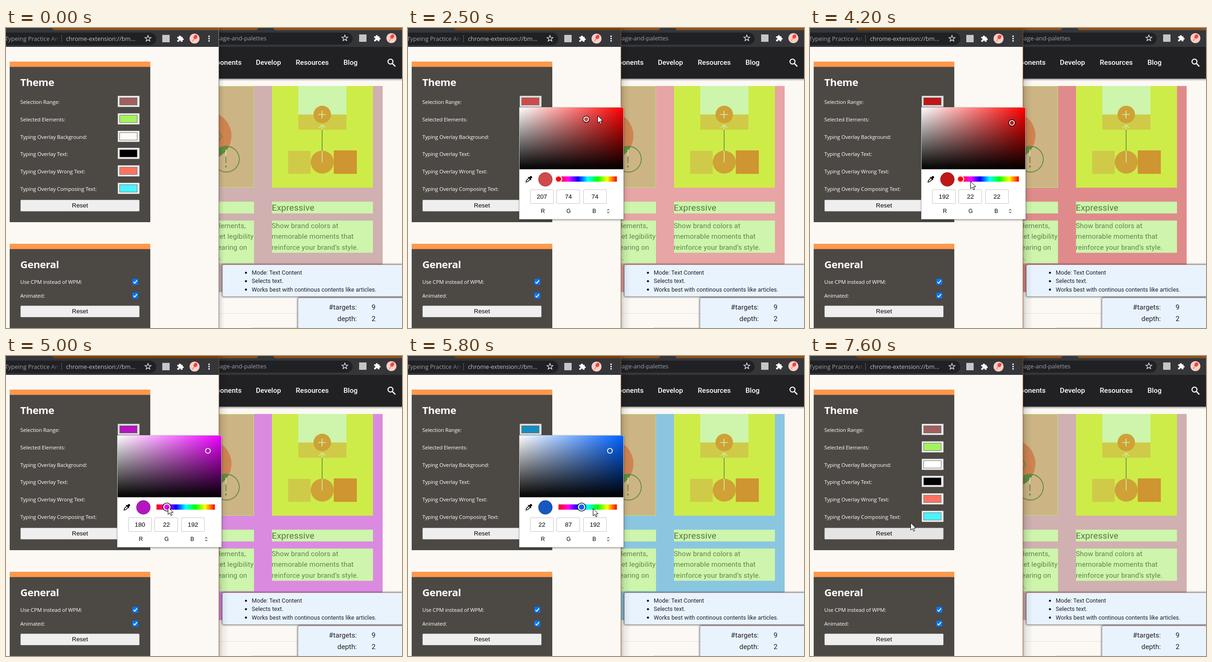
An HTML page for the animation above (7700 ms loop, 859 px wide and 652 px high).

```html
<!DOCTYPE html>
<html lang="en">
<head>
<meta charset="utf-8">
<title>Theme settings</title>
<style>
html, body { margin: 0; width: 100%; height: 100%; overflow: hidden; background: #fcf9f4; }
svg { display: block; width: 859px; height: 652px; }
text { white-space: pre; }
.ui { font-family: "Open Sans", "Noto Sans", sans-serif; }
.web { font-family: Roboto, sans-serif; }
.ctl { font-family: "Liberation Sans", Arial, sans-serif; }
</style>
</head>
<body>
<svg id="stage" viewBox="0 0 859 652" xmlns="http://www.w3.org/2000/svg"></svg>
<script>
const LOOP = 7700, STEP = 100;
const MINT = '#cdf5ac', LEAF = '#5f8c42';

const rect = (x, y, w, h, fill, more = '') =>
  `<rect x="${x}" y="${y}" width="${w}" height="${h}" fill="${fill}" ${more}/>`;
const frame = (x, y, w, h, fill, stroke, more = '') =>
  rect(x + .5, y + .5, w - 1, h - 1, fill, `stroke="${stroke}" ${more}`);
const disc = (x, y, r, fill, more = '') =>
  `<circle cx="${x}" cy="${y}" r="${r}" fill="${fill}" ${more}/>`;
const line = (d, stroke, w = 1, more = '') =>
  `<path d="${d}" fill="none" stroke="${stroke}" stroke-width="${w}" ${more}/>`;
const text = (x, y, s, size, fill, cls, more = '') =>
  `<text x="${x}" y="${y}" font-size="${size}" fill="${fill}" class="${cls}" ${more}>${s}</text>`;
const END = 'text-anchor="end"', MID = 'text-anchor="middle"';
const ramp = (id, dir, stops) => `<linearGradient id="${id}" ${dir}>` + stops.map(([o, c, a = 1]) =>
  `<stop offset="${o}" stop-color="${c}" stop-opacity="${a}"/>`).join('') + '</linearGradient>';
const ACROSS = 'x1="0" x2="1"', DOWN = 'x1="0" x2="0" y1="0" y2="1"';

function star(x, y) {
  let d = '';
  for (let i = 0; i < 10; i++) {
    const r = i % 2 ? 2.9 : 6.8, a = i * Math.PI / 5;
    d += (i ? 'L' : 'M') + (x + r * Math.sin(a)).toFixed(1) + ' ' + (y - r * Math.cos(a)).toFixed(1);
  }
  return line(d + 'Z', '#e8eaed', 1.3);
}

const puzzle = (x, y) => `<path transform="translate(${x - 7},${y - 7})" fill="#fff"
  d="M1.5 3H4.3A2 2 0 1 1 8.2 3H11Q12 3 12 4V6.4A2 2 0 1 1 12 10.2V13Q12 14 11 14H8.4A2 2 0 1 0 4.5 14H1.5Q.5 14 .5 13V10.2A2 2 0 1 0 .5 6.4V4Q.5 3 1.5 3Z"/>`;

const avatar = (x, y) => disc(x, y, 10.8, '#fccfc8') +
  `<ellipse cx="${x + 2}" cy="${y - 3.5}" rx="4" ry="5" fill="#f0473f" transform="rotate(35 ${x + 2} ${y - 3.5})"/>` +
  line(`M${x - 1} ${y + 1}l-4 5`, '#ef9a78', 2.2);

const toolbar = (x, y) => star(x, y) + rect(x + 31, y - 8, 16, 16, '#c6c6c6') + puzzle(x + 70, y) + avatar(x + 101, y);

function rightWindow() {
  let s = rect(462, 0, 397, 652, '#fcf8f3') + rect(462, 0, 397, 41, '#35363a') +
    '<path d="M462 0H547Q546 5 541 5H462ZM580 0H859V5H586Q581 5 580 0Z" fill="#8a5020"/>' +
    rect(440, 10, 312, 26, '#202124', 'rx="13"') +
    text(565, 27, 'usage-and-palettes', 13, '#9aa0a6', 'ui', END) + toolbar(735, 22);
  s += rect(462, 110, 397, 5, 'url(#under)') + rect(462, 41, 397, 69, '#212124');
  s += text(511, 80, 'Components', 15.2, '#fff', 'web', END + ' font-weight="500"');
  [[542, 'Develop'], [628.5, 'Resources'], [732, 'Blog']].forEach(([x, w]) =>
    s += text(x, 80, w, 15.2, '#fff', 'web', 'font-weight="500"'));
  s += disc(834, 73, 5.4, 'none', 'stroke="#fff" stroke-width="2.2"') + line('M838 77l6.5 6.5', '#fff', 2.5);
  s += rect(462, 620, 172, 1, '#e2dfda') + rect(533, 651, 100, 1, '#d8d5d2');
  s += rect(440, 126, 377, 448, '#d0b0b0', 'id="range"');

  // first card
  s += frame(440, 126, 98, 221, '#cdb484', '#b5e884') + disc(437, 234, 52, '#cf8450') +
    disc(478, 285, 28, LEAF, 'clip-path="url(#lens)"') +
    disc(478, 285, 28, 'none', `stroke="${LEAF}" stroke-width="1.8"`) +
    line('M477 264V279', MINT, 1.6) + line('M477 279V293', LEAF, 1.8) + disc(477, 301, 1.9, LEAF) +
    line('M462 226L468 236L462 245', LEAF, 1.5);
  // second card
  s += rect(577, 126, 219, 221, '#ceec48') + rect(634, 126, 104.5, 62, MINT) +
    rect(634, 188, 104.5, 33, '#cfcb48') + disc(686, 188, 19, '#cfa136') +
    line('M677 188H694M685.5 179.500V196.500', MINT, 1.7) +
    rect(612, 267, 49, 50, '#cfcb48') + rect(711, 266, 50, 51, '#cf9530') + disc(686, 291.500, 25, '#cfa136') +
    line('M685.700 221V267', LEAF, 1.6) + line('M685.700 211V221M685.700 267V292M679 217L685.700 210.500L692.500 217', MINT, 1.6);
  // captions
  s += rect(440, 377.5, 98, 25.5, MINT) + rect(577, 377.5, 219, 25.5, MINT) +
    rect(440, 418.5, 98, 93, MINT) + rect(577, 418.5, 219, 70, MINT);
  const ink = '#64854d', gap = 'letter-spacing=".1"';
  s += text(576.5, 397, 'Expressive', 19, '#56783f', 'web', 'letter-spacing=".2"');
  ['Show brand colors at', 'memorable moments that', 'reinforce your brand’s style.'].forEach((w, i) =>
    s += text(576.5, 435 + i * 23.3, w, 15.2, ink, 'web', gap));
  [[520, 'elements,'], [537, 'meet legibility'], [523, 'appearing on'], [468, 'surfaces.']].forEach(([x, w], i) =>
    s += text(x, 435 + i * 23.3, w, 15.2, ink, 'web', gap + END));

  // status boxes
  const box = (x, y, w, h) => rect(x, y, w, h, '#000', 'rx="3" opacity=".75" filter="url(#blur)"') +
    frame(x, y, w, h, '#e9f3fd', '#a9afb6', 'rx="3"') + line(`M${x + 2} ${y + .5}H859`, '#d0705c', 1, 'stroke-dasharray="1 1"');
  s += box(469, 514, 400, 70) + box(633, 586, 240, 80);
  ['Mode: Text Content', 'Selects text.', 'Works best with continous contents like articles.'].forEach((w, i) =>
    s += disc(520.5, 532 + i * 18.3, 2.3, '#111') + text(533, 536 + i * 18.3, w, 12.6, '#202124', 'web'));
  [['#targets:', 9], ['depth:', 2]].forEach(([w, n], i) =>
    s += text(761, 612 + i * 25, w, 15.2, '#202124', 'web', END) + text(793, 612 + i * 25, n, 15.2, '#202124', 'web'));
  return s;
}

const button = (y, id) => frame(31, y, 259, 26, '#efefef', '#8a8886', `rx="2" id="${id}"`) +
  text(160.5, y + 17.3, 'Reset', 13.33, '#000', 'ctl', MID);
const label = (y, s) => text(31, y, s, 11.4, '#fff', 'ui', 'letter-spacing="-.12"');
const title = (y, s) => text(31, y, s, 22.2, '#fff', 'ui', 'font-weight="700" letter-spacing="-.4"');
const panel = (y, h) => rect(8, y, 305, h, '#4c4844') + rect(8, y, 305, 11.5, '#ff984a');

function leftWindow() {
  let s = rect(462, 0, 21, 652, 'url(#cast)', 'id="shade"') + rect(0, 0, 462, 652, '#fcf9f4') +
    rect(0, 0, 462, 41, '#35363a') +
    '<path id="strip" d="M100 0H462V5H107Q101 5 100 0Z"/>' +
    rect(-20, 10, 346, 27, '#202124', 'rx="13.500"') +
    text(-2, 28, 'Typeing Practice An', 12.8, '#9aa0a6', 'ui') + rect(96, 14, 19, 20, 'url(#fade)') +
    rect(120, 15, 1, 16, '#5f6368') + text(130, 28, 'chrome-extension://bm...', 12.8, '#bdc1c6', 'ui') + toolbar(308, 23);
  [18, 23, 28].forEach(y => s += disc(440.5, y, 1.7, '#fff'));
  s += rect(461, 0, 1, 652, '#8e8b88', 'id="edge"');
  s += panel(73, 349) + title(126, 'Theme');
  const rows = [['Selection Range:', '#a06060'], ['Selected Elements:', '#a2f35c'], ['Typing Overlay Background:', '#fdfaf4'],
    ['Typing Overlay Text:', '#000'], ['Typing Overlay Wrong Text:', '#ff7262'], ['Typing Overlay Composing Text:', '#4af4ff']];
  rows.forEach(([w, c], i) => {
    const y = Math.round(147 + i * 37.8);
    s += label(y + 17.5, w) + frame(242, y, 48, 25, '#efefef', '#9a9896', `rx="1" id="well${i}"`) +
      frame(246, y + 4, 39, 17, c, '#777', `id="swatch${i}"`);
  });
  s += button(373, 'reset') + panel(469, 190) + title(521.5, 'General');
  [['Use CPM instead of WPM:', 545], ['Animated:', 575]].forEach(([w, y]) =>
    s += label(y + 11, w) + rect(274, y, 13, 13, '#0075ff', 'rx="2"') + line(`M276.500 ${y + 6.8}l2.8 2.8l5-6.3`, '#fff', 1.9));
  return s + button(603, 'reset2');
}

function picker() {
  let s = rect(242, 174, 226, 243, '#000', 'opacity=".45" filter="url(#blur)"') +
    frame(241, 172, 227, 244, '#fff', '#c4c4c4') +
    rect(242, 173, 225, 134, '#f00', 'id="pure"') + rect(242, 173, 225, 134, 'url(#pale)') + rect(242, 173, 225, 134, 'url(#dark)') +
    '<g id="thumb">' + disc(0, 0, 7.5, '#000', 'id="halo"') + disc(0, 0, 6.2, '#fff') + disc(0, 0, 4.3, '#000', 'id="dot"') + '</g>';
  s += '<g transform="translate(262,329) rotate(45)">' + rect(-2.5, -9, 5, 6.5, '#000', 'rx="2"') + rect(-4.5, -3.5, 9, 2, '#000') +
    line('M-2 -1.500V5L0 8.500L2 5V-1.500', '#000', 1.5) + '</g>';
  s += disc(298, 329, 15.2, '#000', 'id="chip" stroke="#000" stroke-opacity=".3"') + rect(326.5, 322.5, 126.5, 11.5, 'url(#hues)') +
    '<g id="knob">' + disc(0, 0, 9.5, '#000', 'id="knobHalo"') + disc(0, 0, 8, '#fff', 'stroke="#bbb" stroke-width=".6"') + disc(0, 0, 5.8, '#f00', 'id="knobDot"') + '</g>';
  ['R', 'G', 'B'].forEach((w, i) => {
    const x = 264.5 + i * 57.5;
    s += frame(Math.round(x), 351, 51, 31, '#fff', '#c6c6c6', 'rx="1.500"') +
      text(x + 26, 371.3, '', 13.6, '#000', 'ctl', MID + ` id="num${i}"`) +
      text(292.5 + i * 55.8, 402, w, 12, '#000', 'ctl', MID);
  });
  return `<g id="picker">${s}${line('M432 396.500l2.300 -2.500l2.300 2.500M432 399.500l2.300 2.500l2.300 -2.500', '#222', 1.1)}</g>`;
}

const defs = '<defs>' + ramp('pale', ACROSS, [[0, '#fff'], [1, '#fff', 0]]) + ramp('dark', DOWN, [[0, '#000', 0], [1, '#000']]) +
  ramp('hues', ACROSS, ['#f00', '#f0f', '#00f', '#0ff', '#0f0', '#ff0', '#f00'].map((c, i) => [i / 6, c])) +
  ramp('cast', ACROSS, [[0, '#000', .2], [.35, '#000', .07], [1, '#000', 0]]) +
  ramp('under', DOWN, [[0, '#000', .4], [1, '#000', 0]]) + ramp('fade', ACROSS, [[0, '#202124', 0], [1, '#202124', .8]]) +
  '<clipPath id="lens"><circle cx="437" cy="234" r="52"/></clipPath>' +
  '<filter id="blur" x="-10%" y="-20%" width="120%" height="140%"><feGaussianBlur stdDeviation="2.2"/></filter></defs>';

document.getElementById('stage').innerHTML = defs + rightWindow() + leftWindow() + picker() +
  '<path id="cursor" d="M.5 .5V16.500L4.200 13L6.700 18.700L9.200 17.600L6.700 12H11.700Z" fill="#fff" stroke="#000"/>';

const node = {};
document.querySelectorAll('[id]').forEach(e => node[e.id] = e);
const set = (id, k, v) => node[id].setAttribute(k, v);
const show = (id, on) => set(id, 'visibility', on ? 'inherit' : 'hidden');

// keys: [time, ...values], joined by straight segments
function track(keys, t) {
  const i = keys.findIndex(k => k[0] > t);
  if (i === 0) return keys[0].slice(1);
  if (i < 0) return keys[keys.length - 1].slice(1);
  const a = keys[i - 1], b = keys[i], p = (t - a[0]) / (b[0] - a[0]);
  return a.slice(1).map((v, j) => v + (b[j + 1] - v) * p);
}

const pointer = [[400, 291, 44], [500, 264, 92], [600, 225, 146], [700, 238, 172], [800, 262, 163], [1200, 262, 163],
  [1600, 371, 236], [1800, 371, 236], [2000, 366, 232], [2300, 387, 199], [2500, 411, 190], [2800, 452, 184], [3100, 441, 206],
  [3300, 438, 206], [3600, 338, 331], [3800, 338, 331], [4200, 348, 333], [4500, 349, 328], [5000, 351, 328],
  [5300, 362, 329], [5800, 401, 331], [6300, 418, 330], [6600, 418, 330], [7000, 218, 382], [7500, 218, 382], [7600, 218, 362]];
const shade = [[1800, .4, .6275], [2100, .55, .58], [2500, .6425, .8118], [3000, .93, .9], [3400, .8854, .753]];
const hueShown = [[4300, 360], [4500, 300], [5000, 295.8], [5300, 280], [5800, 217], [6500, 102]];
const huePage = [[4300, 360], [4500, 300], [5000, 295.8], [5300, 270], [5800, 198], [6300, 102]];

const hsv = (h, s, v) => [5, 3, 1].map(n => {
  const k = (n + h / 60) % 6;
  return Math.round(255 * v * (1 - s * Math.max(0, Math.min(k, 4 - k, 1))));
});
const css = c => `rgb(${c})`;

function draw(t) {
  const focused = t >= 1100, cleared = t >= 7300;
  const [s, v] = track(shade, t), [h] = track(hueShown, t);
  const shown = hsv(h, s, v), pure = css(hsv(h, 1, 1));
  const page = cleared ? [160, 96, 96] : hsv(track(huePage, t)[0], s, v);

  set('strip', 'fill', focused ? '#7b3e04' : '#8a5020');
  set('edge', 'fill', focused ? '#8a552b' : '#8e8b88');
  set('edge', 'x', focused ? 461.5 : 461);
  set('shade', 'width', focused ? 21 : 12);
  set('range', 'fill', css(page.map(c => Math.round((c + 255) / 2))));
  set('swatch0', 'fill', css(page));
  set('swatch2', 'fill', cleared ? '#fff' : '#fdfaf4');
  set('well0', 'fill', t >= 700 && t < 6700 ? '#e2e2e2' : '#efefef');
  set('reset', 'fill', t >= 7000 ? '#e5e5e5' : '#efefef');

  show('picker', t >= 1200 && t < 7200);
  set('pure', 'fill', pure);
  set('thumb', 'transform', `translate(${Math.min(438, 242 + 225 * s)},${173 + 134 * (1 - v)})`);
  set('dot', 'fill', css(shown));
  set('chip', 'fill', css(shown));
  set('knob', 'transform', `translate(${326.5 + 126 * (1 - h / 360)},328.3)`);
  set('knobDot', 'fill', pure);
  show('halo', t < 4400);
  show('knobHalo', t >= 4400);
  shown.forEach((c, i) => node['num' + i].textContent = c);

  show('cursor', t >= 400);
  set('cursor', 'transform', `translate(${track(pointer, t).map(Math.round)})`);
}

function tick(now) {
  draw(Math.floor(now % LOOP / STEP) * STEP);
  requestAnimationFrame(tick);
}
draw(0);
requestAnimationFrame(tick);
</script>
</body>
</html>
```
